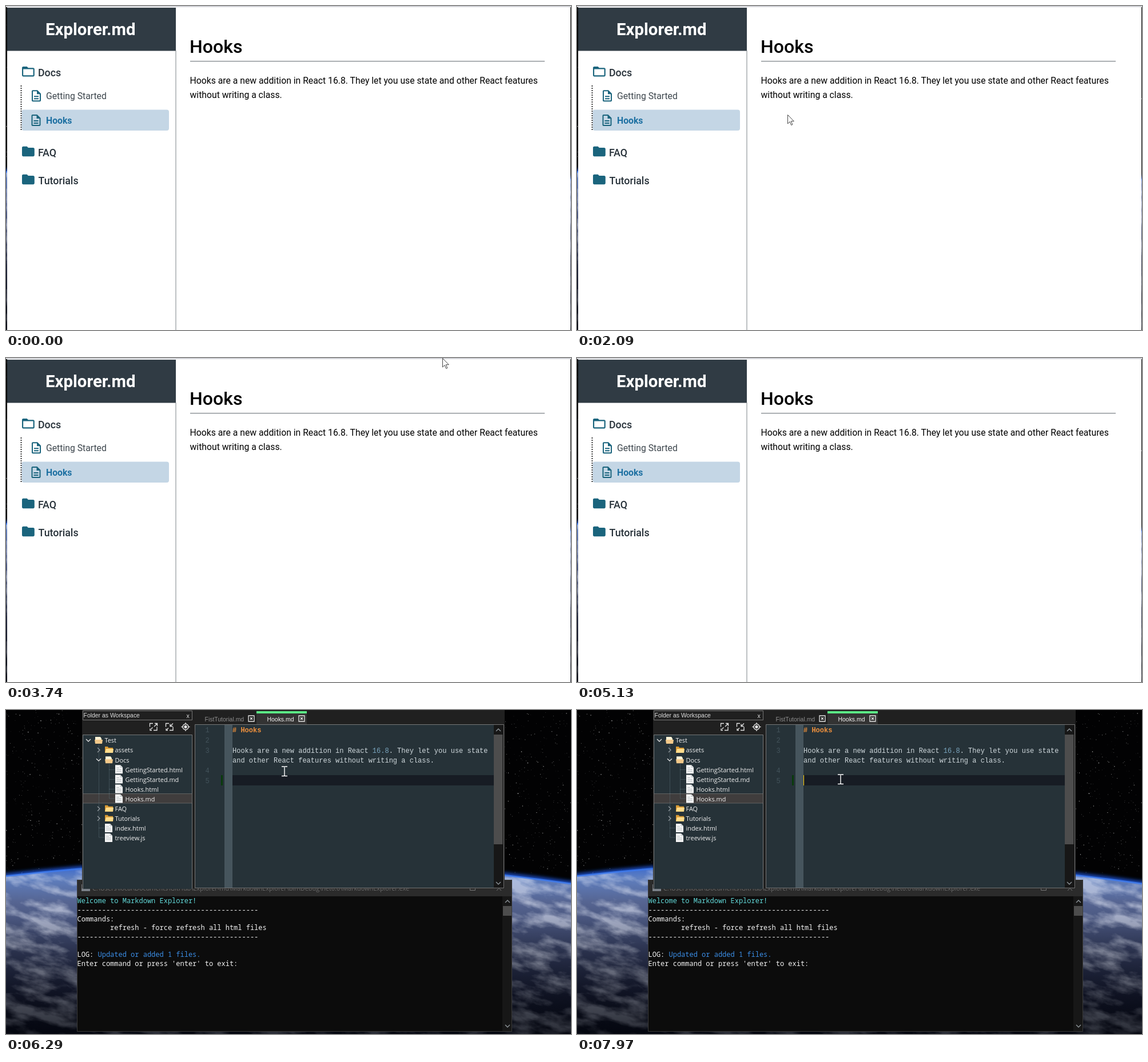
These frames come from a looping animation (988 by 567 pixels, 8 s). An HTML page:

```html
<!DOCTYPE html>
<html lang="en">
<head>
<meta charset="utf-8">
<title>Explorer.md</title>
<style>
  html, body { margin: 0; width: 100%; height: 100%; overflow: hidden; background: #000; }
  svg { display: block; width: 100vw; height: 100vh; }
  text { white-space: pre; }
  #page { font: 15.75px Roboto, sans-serif; }
  .folder { font-size: 17.8px; font-weight: 500; fill: #28323a; }
  .icon { fill: #1a647d; }
  .ui { font: 10.45px "Liberation Sans", Arial, sans-serif; fill: #ddd; }
  .tree { font: 10.9px "Open Sans", sans-serif; fill: #f0f0f0; }
  .code { font: 12px "Liberation Mono", monospace; fill: #cfd8dc; }
  .console { font: 500 12px "Noto Sans Mono", monospace; fill: #f2f2f2; }
  .line { fill: none; stroke: #e4e4e4; stroke-width: 1.3; }
  .dim { fill: none; stroke: #8d9499; stroke-width: 1.4; }
</style>
</head>
<body>
<svg viewBox="0 0 988 567" xmlns="http://www.w3.org/2000/svg">
  <defs>
    <path id="globe" d="M-20 293Q494 231 1008 307V600H-20Z"/>
    <clipPath id="globeClip"><use href="#globe"/></clipPath>
    <linearGradient id="sea" gradientUnits="userSpaceOnUse" x1="0" y1="270" x2="0" y2="567">
      <stop offset="0" stop-color="#3465d0"/>
      <stop offset=".08" stop-color="#5f7fc0"/>
      <stop offset=".22" stop-color="#566592"/>
      <stop offset=".5" stop-color="#363f60"/>
      <stop offset=".75" stop-color="#1c2138"/>
      <stop offset="1" stop-color="#0a0d18"/>
    </linearGradient>
    <linearGradient id="night" gradientUnits="userSpaceOnUse" x1="0" y1="360" x2="0" y2="567">
      <stop offset="0" stop-color="#02040c" stop-opacity="0"/>
      <stop offset="1" stop-color="#02040c" stop-opacity=".7"/>
    </linearGradient>
    <filter id="glow" x="-5%" y="-20%" width="110%" height="140%"><feGaussianBlur stdDeviation="3"/></filter>
    <filter id="clouds" x="0" y="0" width="100%" height="100%">
      <feTurbulence type="fractalNoise" baseFrequency=".018 .045" numOctaves="6" seed="8"/>
      <feColorMatrix values="0 0 0 0 .74  0 0 0 0 .78  0 0 0 0 .9  3 0 0 0 -1.2"/>
    </filter>
    <path id="closed" d="M10 4H4c-1.1 0-2 .9-2 2v12c0 1.1.9 2 2 2h16c1.1 0 2-.9 2-2V8c0-1.1-.9-2-2-2h-8z"/>
    <path id="opened" d="M20 6h-8l-2-2H4c-1.1 0-2 .9-2 2v12c0 1.1.9 2 2 2h16c1.1 0 2-.9 2-2V8c0-1.1-.9-2-2-2zm0 12H4V8h16z"/>
    <path id="doc" d="M8 16h8v2H8zm0-4h8v2H8zm6-10H6c-1.1 0-2 .9-2 2v16c0 1.1.9 2 2 2h12c1.1 0 2-.9 2-2V8zm4 18H6V4h7v5h5z"/>
    <g id="dir"><path d="M0 1h5l1 2h8v9H0z" fill="#d99a35"/><path d="M0 12 2 5h13l-1 7z" fill="#ffdc8c"/></g>
    <g id="dirOpen"><path d="M1 1h9l2 3v8H1z" fill="#fff3d6"/><path d="M0 6h14l-1 7H1z" fill="#f3c98a"/></g>
    <g id="file"><path d="M0 0h9l4 4v11H0z" fill="#f7f7f7"/><path d="M9 0v4h4M2 5h5M2 8h9M2 11h9" stroke="#b4bcc0" fill="none"/></g>
    <g id="close"><path class="line" d="M-5-5H5V5H-5Z"/><path class="line" d="M-2-2 2 2M2-2-2 2" stroke-width="1.8"/></g>
    <path id="corners" d="M-1-6h-5.500V0M6 0v6h-6M-6 3v3h3"/>
  </defs>

  <g id="wallpaper">
    <rect width="988" height="567" fill="#020203"/>
    <g id="stars" fill="#fff"></g>
    <use href="#globe" fill="none" stroke="#1d4fc8" stroke-width="9" filter="url(#glow)"/>
    <use href="#globe" fill="url(#sea)"/>
    <g clip-path="url(#globeClip)">
      <rect x="-200" y="100" width="1400" height="800" filter="url(#clouds)" opacity=".6" transform="rotate(14 494 400)"/>
      <rect y="260" width="988" height="307" fill="url(#night)"/>
    </g>
    <use href="#globe" fill="none" stroke="#3f7cf0" stroke-width="3" opacity=".8"/>
  </g>

  <g id="page">
    <path fill="#d4d5da" d="M0 0h988v2H0z"/>
    <path fill="#fff" d="M2 2h985v565H2z"/>
    <path fill="#303b44" d="M2 3h295v75.500H2z"/>
    <path fill="#7d8388" d="M296.500 78h1v489h-1zM322 96h620v1.200H322z"/>
    <text x="69" y="50.500" font-size="29.400" font-weight="700" fill="#fff">Explorer.md</text>

    <rect x="27.500" y="181.500" width="257.500" height="36.500" rx="4" fill="#c4d6e5"/>
    <path d="M26.500 139v79" stroke="#222" stroke-width="1.800" stroke-dasharray="2 2"/>
    <g class="icon">
      <use href="#opened" transform="translate(25.800 101.700) scale(1.09)"/>
      <use href="#doc" transform="translate(41 145.200)"/>
      <use href="#doc" transform="translate(40.500 188)"/>
      <use href="#closed" transform="translate(25.800 241.500) scale(1.09)"/>
      <use href="#closed" transform="translate(25.800 290.500) scale(1.09)"/>
    </g>
    <g class="folder">
      <text x="56" y="123">Docs</text>
      <text x="56" y="263">FAQ</text>
      <text x="56.500" y="312">Tutorials</text>
    </g>
    <text x="70" y="163" fill="#3d464d">Getting Started</text>
    <text x="70" y="205.500" font-weight="700" fill="#1d70a2">Hooks</text>

    <text x="321" y="82" font-size="32" font-weight="500">Hooks</text>
    <text x="321.500" y="136">Hooks are a new addition in React 16.8. They let you use state and other React features</text>
    <text x="321.500" y="160.800">without writing a class.</text>
  </g>

  <g id="desktop">
    <g id="terminal">
      <path fill="#2b2b2b" d="M124 297h761v29H124z"/>
      <path fill="#0c0c0c" d="M124 326h744v236H124z"/>
      <path fill="#171717" d="M868 326h17v236h-17z"/>
      <path fill="#4d4d4d" d="M869 343h15v17h-15z"/>
      <path fill="none" stroke="#3a3a3a" d="M124.500 297.500h760v265h-760z"/>
      <path class="dim" d="m873 337 4-4 4 4M873 551l4 4 4-4"/>
      <path fill="none" stroke="#777" d="M811.500 307.500h9v8h-9zM858 308l8 8M866 308l-8 8"/>
      <path fill="#7b8189" d="M132 305h15v12h-15z"/>
      <text x="151" y="316" class="tree" style="fill:#6e6e6e">C:\Users\local\Documents\GitHub\Explorer-md\MarkdownExplorer\bin\Debug\net6.0\MarkdownExplorer.exe</text>
      <g id="output" class="console"></g>
    </g>

    <g id="editor">
      <path fill="#202020" d="M133 0h739v312.500H133z"/>
      <path fill="#263238" d="M134 43h192v270H134zM331 25h522v286H331z"/>
      <path fill="none" stroke="#8b8b8b" d="M134.500 1.500h191v16h-191zM134.500 313V43.500h191V313M330.500 25.500h540v286h-540z" stroke-width=".8"/>
      <text class="ui" x="135.500" y="13">Folder as Workspace</text>
      <text class="ui" x="315.500" y="14">x</text>
      <g class="line">
        <use href="#corners" x="258" y="29.500"/>
        <use href="#corners" x="286" y="29.500"/>
        <path d="M260 23.500h4.500V28M264 24l-5 5M253.500 33.500l3-3M292 23.500l-5 5M287 24.500v4h4.500M281 34.500l3-3"/>
        <circle cx="314" cy="29.500" r="5"/>
        <circle cx="314" cy="29.500" r="2" fill="#e4e4e4"/>
        <path d="M314 22v3M314 34v3M306.500 29.500h3M318.500 29.500h3"/>
      </g>

      <path fill="#403d3d" stroke="#757575" stroke-width=".7" d="M134.500 146.500h191v16.500h-191z"/>
      <path fill="none" stroke="#566971" stroke-dasharray="1 1" d="M162.500 61v162h9M162.500 206.500h9M180.500 95v60h10M180.500 104.500h10M180.500 121.500h10M180.500 138.500h10"/>
      <g id="tree" class="tree"></g>

      <path fill="#333" d="M438 2h88v23h-88z"/>
      <path fill="#5bed86" d="M438 2h88v4h-88z"/>
      <text class="ui" x="347.500" y="19.500" style="fill:#8e8e8e">FistTutorial.md</text>
      <text class="ui" x="456.500" y="19.500" style="fill:#f4f4f4">Hooks.md</text>
      <use href="#close" x="429" y="15"/>
      <use href="#close" x="517" y="15"/>

      <path fill="#46555d" d="M382 26h14v285h-14z"/>
      <path fill="#171c24" d="M396 114h457v18H396z"/>
      <path fill="#093a0c" d="M376 114h3v18h-3z"/>
      <path fill="#171717" d="M853 26h17v285h-17z"/>
      <path fill="#4d4d4d" d="M853 43h15.500v192H853z"/>
      <path class="dim" d="m857 37 4-4 4 4M857 301l4 4 4-4"/>
      <g id="numbers" class="code" style="fill:#43535b"></g>
      <text class="code" x="396" y="39" style="fill:#f0913d;font-weight:700"># Hooks</text>
      <text class="code" x="396" y="74.500">Hooks are a new addition in React <tspan fill="#7ba6bf">16.8</tspan>. They let you use state</text>
      <text class="code" x="396" y="92.300">and other React features without writing a class.</text>
      <path id="caret" fill="#ffcc00" d="M396 114h1v18h-1z"/>
    </g>
  </g>

  <path id="arrow" d="M.5.500v15.500l3.600-3.500 2.600 6 2.200-1-2.600-5.800h5z" fill="#fff" stroke="#333" stroke-width=".9"/>
  <path id="beam" d="M-5-8h4l1 1 1-1h4M0-7.500v15.500M-5 8.500h4l1-1 1 1h4" fill="none" stroke="#fff" stroke-width="1.400"/>
</svg>
<script>
const $ = id => document.getElementById(id);
const add = (parent, tag, attrs, content = '') => {
  const node = document.createElementNS('http://www.w3.org/2000/svg', tag);
  for (const name in attrs) node.setAttribute(name, attrs[name]);
  node.textContent = content;
  parent.append(node);
};

let seed = 7;
const random = () => (seed = seed * 16807 % 2147483647) / 2147483647;
for (let i = 0; i < 2400; i++) {
  const size = 0.7 + 0.8 * random() ** 4;
  add($('stars'), 'rect', { x: random() * 988, y: random() * 285, width: size, height: size, opacity: 0.15 + 0.7 * random() ** 2 });
}

// name, depth, icon, chevron
const rows = [
  ['Test', 0, 'dirOpen', 'down'], ['assets', 1, 'dir', 'right'], ['Docs', 1, 'dirOpen', 'down'],
  ['GettingStarted.html', 2, 'file'], ['GettingStarted.md', 2, 'file'],
  ['Hooks.html', 2, 'file'], ['Hooks.md', 2, 'file'],
  ['FAQ', 1, 'dir', 'right'], ['Tutorials', 1, 'dir', 'right'],
  ['index.html', 1, 'file'], ['treeview.js', 1, 'file']
];
rows.forEach(([name, depth, icon, chevron], i) => {
  const x = 173 + 18 * depth, y = 53 + 17.1 * i;
  if (chevron) add($('tree'), 'path', {
    class: chevron === 'down' ? 'line' : 'dim',
    d: `M${x - 29} ${y}` + (chevron === 'down' ? 'm-4-2 4 4 4-4' : 'm-2-4 4 4-4 4')
  });
  add($('tree'), 'use', { href: '#' + icon, x: x - 18, y: y - (icon === 'file' ? 8 : 7) });
  add($('tree'), 'text', { x: x - 0.5, y: y + 4.3 }, name);
});

[39, 57, 74.5, 110, 128].forEach((y, i) => add($('numbers'), 'text', { x: 348.5, y }, i + 1));

const rule = '-'.repeat(44);
['Welcome to Markdown Explorer!', rule, 'Commands:', ' '.repeat(8) + 'refresh - force refresh all html files',
  rule, '', 'LOG:', "Enter command or press 'enter' to exit:"
].forEach((content, i) =>
  add($('output'), 'text', { x: 124.5, y: 338.3 + 15.65 * i, fill: i ? '#f2f2f2' : '#61d6d6' }, content));
add($('output'), 'text', { x: 160.5, y: 338.3 + 15.65 * 6, fill: '#3b8ee6' }, 'Updated or added 1 files.');

// start, end, steps, waypoints
const arrowMoves = [
  [720, 1270, 9, [[1030, 638], [780, 400], [600, 240], [505, 160], [475, 139]]],
  [1620, 2360, 12, [[475, 139], [481, 120], [440, 98], [385, 130], [368, 190], [405, 242], [449, 210]]],
  [2430, 2900, 8, [[449, 210], [435, 130], [385, 115], [404, 143], [400, 236]]],
  [3100, 3310, 4, [[400, 236], [438, 228]]],
  [3460, 3810, 6, [[438, 228], [520, 120], [680, 30], [846, -30]]]
];
const beamMoves = [
  [5860, 6290, 7, [[795, -11], [620, 50], [530, 90], [486.5, 107]]],
  [6360, 6560, 4, [[486.5, 107], [467, 117]]],
  [6760, 6890, 2, [[467, 117], [461.4, 121]]]
];

function position(moves, t) {
  const move = moves.filter(m => t >= m[0]).pop();
  if (!move) return null;
  const [start, end, steps, points] = move;
  const step = Math.floor(Math.min(1, (t - start) / (end - start)) * (steps - 1)) + 1;
  const along = step / steps * (points.length - 1);
  const i = Math.min(Math.floor(along), points.length - 2);
  return points[i].map((v, axis) => v + (points[i + 1][axis] - v) * (along - i));
}

const show = (id, visible) => { $(id).style.display = visible ? '' : 'none'; };

function place(id, point) {
  show(id, point);
  if (point) $(id).setAttribute('transform', `translate(${point.map(Math.round)})`);
}

function draw() {
  const t = performance.now() % 8000;
  const desktop = t >= 5200;
  show('page', !desktop);
  show('desktop', desktop);
  show('caret', t >= 6560 && t < 7370 || t >= 7970);
  place('arrow', t < 3810 ? position(arrowMoves, t) : null);
  place('beam', position(beamMoves, t));
  requestAnimationFrame(draw);
}
draw();
</script>
</body>
</html>
```
